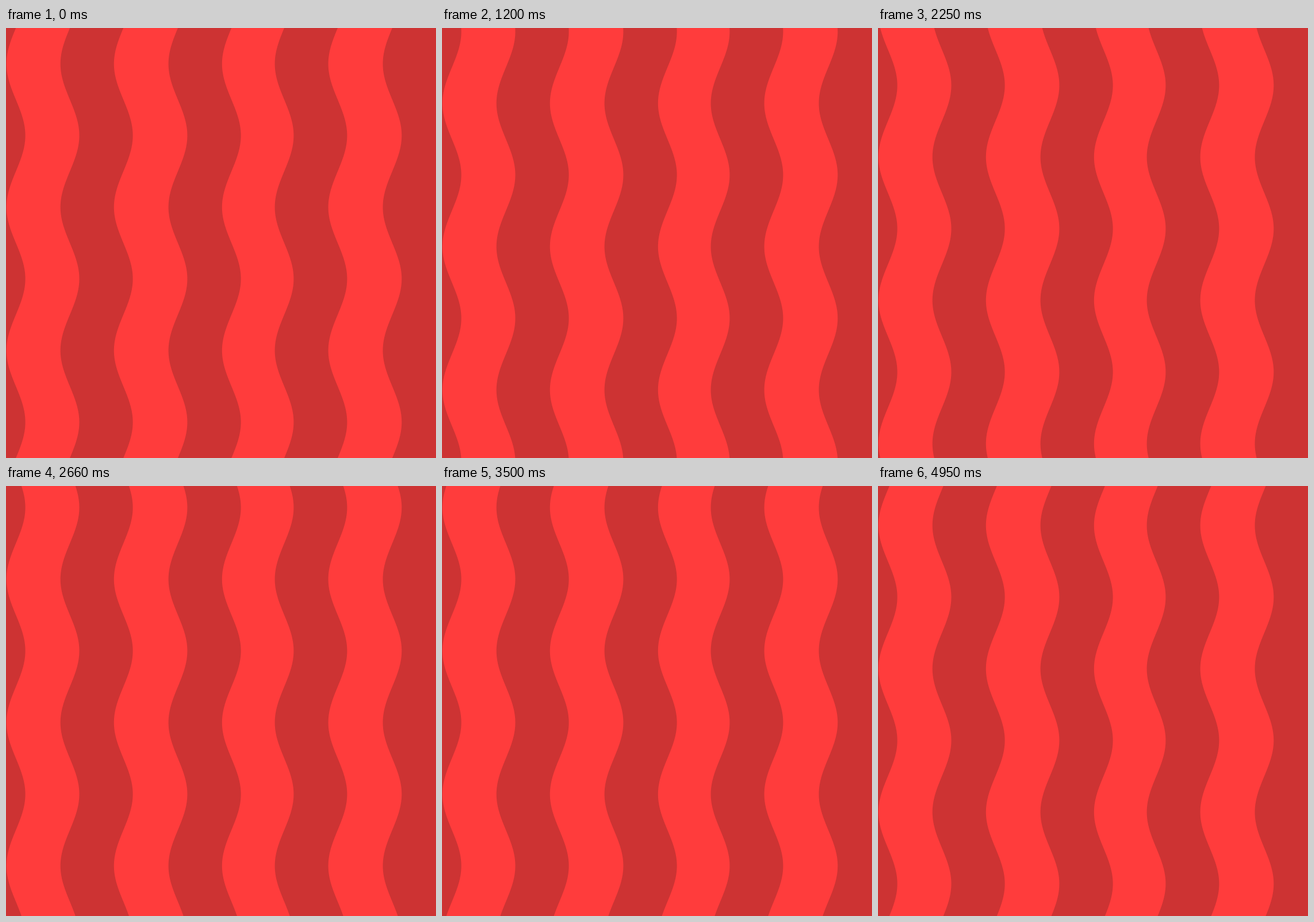
An HTML page with a canvas that plays this animation: 748 px wide and 748 px high, repeating every 5050 ms.

```html
<!DOCTYPE html>
<html>
<head>
<meta charset="utf-8">
<style>
  html, body { margin: 0; width: 100%; height: 100%; overflow: hidden; background: #cd3333; }
  canvas { display: block; }
</style>
</head>
<body>
<canvas width="748" height="748"></canvas>
<script>
const SIZE = 748, LOOP = 5050, STEPS = 120, WAVES = 3, AMP = 16.4;
// Centre lines of each stripe's left and right edge
const STRIPES = [[17.2, 111.1], [204.2, 299], [392.2, 484], [577, 671.9]];
const ctx = document.querySelector('canvas').getContext('2d');

// 24 steps per second on a 10 ms clock; the last step is held to the loop's end
function stepAt(ms) {
  const tick = Math.floor(ms / 10) * 10 + 9.99;
  return Math.min(STEPS - 1, Math.floor(tick * 24 / 1000));
}

function draw(step) {
  const sway = y => AMP * Math.sin(2 * Math.PI * WAVES * (y / SIZE + step / STEPS));
  ctx.fillStyle = '#cd3333';
  ctx.fillRect(0, 0, SIZE, SIZE);
  ctx.fillStyle = '#ff3c3c';
  for (const [left, right] of STRIPES) {
    ctx.beginPath();
    for (let y = 0; y <= SIZE; y += 2) ctx.lineTo(left - sway(y), y);
    for (let y = SIZE; y >= 0; y -= 2) ctx.lineTo(right - sway(y), y);
    ctx.fill();
  }
}

const start = performance.now();
function tick() {
  draw(stepAt((performance.now() - start) % LOOP));
  requestAnimationFrame(tick);
}
tick();
</script>
</body>
</html>
```
